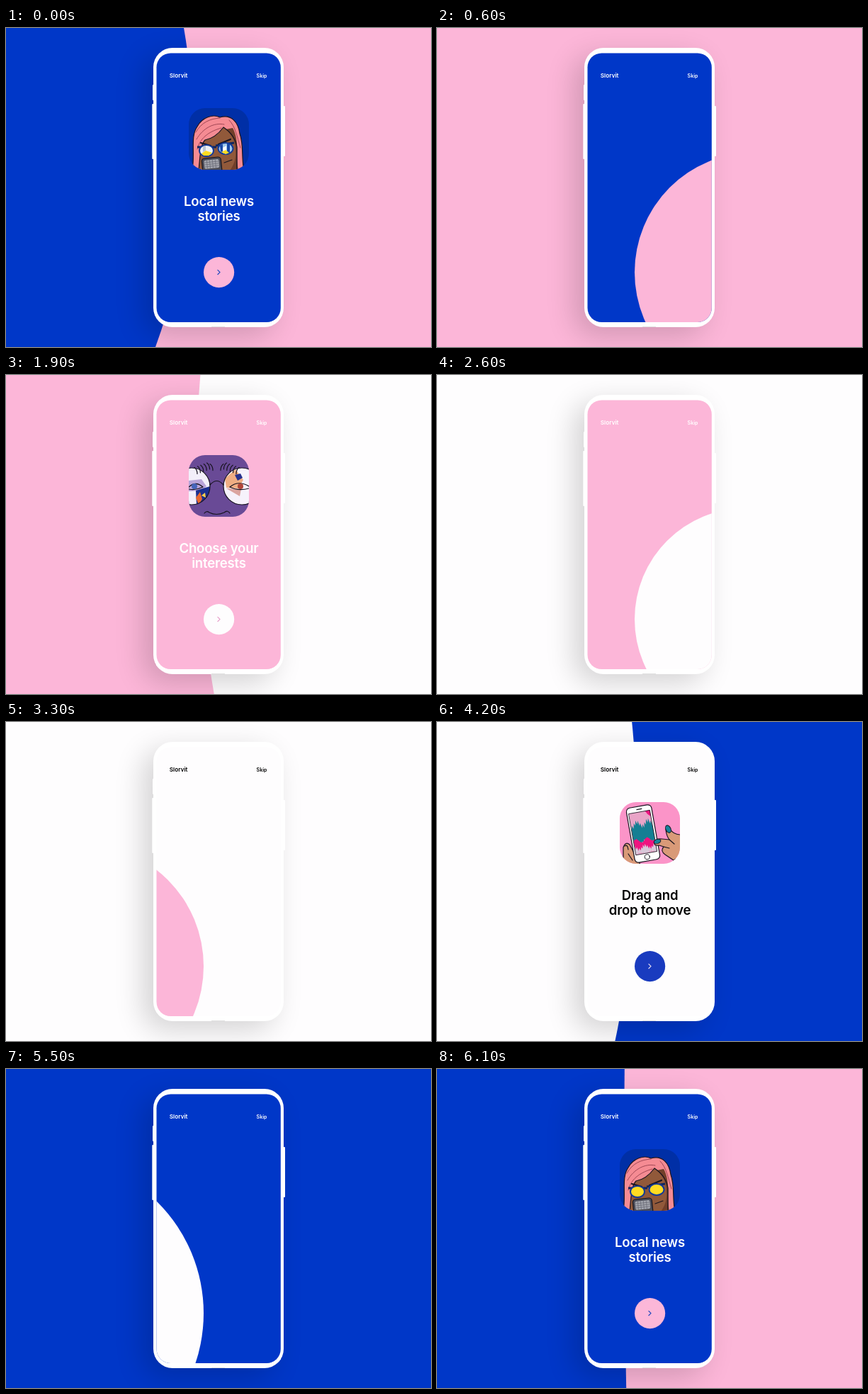
These frames come from a looping animation (600x450 px, 6200 ms). An HTML page:

```html
<!DOCTYPE html>
<html lang="en">
<head>
<meta charset="utf-8">
<title>Onboarding</title>
<style>
  html, body { margin: 0; width: 100%; height: 100%; overflow: hidden; }
  svg { display: block; width: 600px; height: 450px; }
  text { font-family: Inter, "Open Sans", sans-serif; font-weight: 600; }
  .head { font-size: 18.6px; letter-spacing: -.2px; text-anchor: middle; }
  .line { fill: none; stroke: #17131f; stroke-width: 1.2; stroke-linecap: round; stroke-linejoin: round; }
</style>
</head>
<body>
<svg viewBox="0 0 600 450">
  <defs>
    <clipPath id="screenClip"><rect x="212.5" y="35.5" width="175.3" height="379.5" rx="20"/></clipPath>
    <clipPath id="artClip"><rect width="85" height="87" rx="23"/></clipPath>
    <clipPath id="lensL"><circle cx="4" cy="44" r="26"/></clipPath>
    <clipPath id="lensR"><circle cx="75" cy="44" r="26"/></clipPath>
    <filter id="blur" x="-60%" y="-30%" width="220%" height="160%"><feGaussianBlur stdDeviation="20"/></filter>
  </defs>

  <rect id="bg" width="600" height="450"/>
  <circle id="bgDisc"/>

  <rect x="194" y="40" width="184" height="394" rx="28" fill="#000" opacity=".17" filter="url(#blur)"/>
  <g fill="#fff">
    <rect x="207" y="80" width="3" height="22" rx="1"/>
    <rect x="206.3" y="107" width="3" height="78" rx="1"/>
    <rect x="390" y="110" width="4" height="71" rx="1"/>
    <rect x="208" y="28" width="184" height="394" rx="27"/>
  </g>
  <rect x="290" y="421" width="19" height="1" fill="#000" opacity=".12"/>

  <g clip-path="url(#screenClip)">
    <rect id="screen" x="212" y="35" width="177" height="381"/>
    <circle id="disc"/>
  </g>
  <g id="bar">
    <text x="230.8" y="70.3" font-size="8.2">Slorvit</text>
    <text x="353.6" y="70.3" font-size="7">Skip</text>
  </g>

  <g class="page" fill="#fff">
    <g transform="translate(258 113)" clip-path="url(#artClip)">
      <rect width="85" height="87" fill="#002fa6"/>
      <path d="M5 88C9 62 2 40 12 26C19 13 34 8 44 13C60 8 70 20 72 36C78 52 74 70 78 88Z" fill="#f58b93"/>
      <path d="M14 88C16 70 16 52 23 45C34 43 43 35 49 27C58 33 66 42 68 55C69 70 66 78 60 88Z" fill="#91593a"/>
      <path d="M52 30C61 37 66 48 66 60C67 73 63 81 58 88H70C66 66 72 46 62 28Z" fill="#713f2a"/>
      <g class="line" stroke-width="1">
        <path d="M5 88C9 62 2 40 12 26C19 13 34 8 44 13C60 8 70 20 72 36C78 52 74 70 78 88"/>
        <path d="M14 88C16 70 16 52 23 45C34 43 43 35 49 27C58 33 66 42 68 55V88"/>
        <path d="M10 34C18 20 30 15 44 14M11 44C20 28 36 20 50 23M12 58C16 40 32 32 46 28M57 17C66 26 68 40 73 56" stroke="#8b3546" stroke-width=".8"/>
        <path d="M17 49L31 53M42 51L59 44" stroke-width="2.2"/>
      </g>
      <g stroke="#123a98" stroke-width="2">
        <path d="M12 55L39 55M38 53L64 49" stroke="#10275f" stroke-width="3"/>
        <g id="sun" fill="#ffdc22">
          <ellipse cx="25" cy="60" rx="10" ry="8"/><ellipse cx="52" cy="57" rx="10.500" ry="8"/>
        </g>
        <g id="city">
          <ellipse cx="25" cy="60" rx="10" ry="8" fill="#eef1f4"/><ellipse cx="52" cy="57" rx="10.500" ry="8" fill="#9fc8ec"/>
          <g stroke="none">
            <path d="M18 64L24 60L33 63L28 67H21Z" fill="#ffdc22"/>
            <path d="M20 55L24 53V60L20 62Z" fill="#b9c6d6"/>
            <path d="M44 53L48 51V63L45 61ZM54 50H58V64H54Z" fill="#1746a5"/>
            <path d="M48 56L53 53V64H49Z" fill="#fff"/>
            <path d="M46 62L52 59L57 63L52 65Z" fill="#ffdc22"/>
          </g>
        </g>
      </g>
      <path d="M50 77L61 73" class="line"/>
      <g transform="rotate(-6 32 80)">
        <rect x="19" y="70" width="27" height="24" rx="4" fill="#4b4c58" stroke="#15131c" stroke-width="1.2"/>
        <rect x="22" y="73" width="21" height="12" rx="2" fill="#a3a5ad"/>
        <path d="M22 76H43M22 79H43M22 82H43M26 73V85M30 73V85M34 73V85M38 73V85" stroke="#666873" stroke-width=".7"/>
      </g>
    </g>
    <text class="head"><tspan x="300.500" y="251">Local news</tspan><tspan x="300.500" y="272">stories</tspan></text>
  </g>

  <g class="page" fill="#fff">
    <g transform="translate(258 113)" clip-path="url(#artClip)">
      <rect width="85" height="87" fill="#694a96"/>
      <g clip-path="url(#lensL)">
        <rect y="15" width="32" height="60" fill="#f3effa"/>
        <path d="M0 36L18 34L25 44L18 50L0 51Z" fill="#b9a4d8"/>
        <path d="M10 50L30 44V70H11Z" fill="#1c2f8f"/>
        <path d="M10 60L16 52L19 62L14 70Z" fill="#e8672f"/>
        <path d="M18 57L23 53L24 60Z" fill="#ffd24a"/>
        <path d="M0 45Q10 36 20 45Q10 50 0 48" fill="#e6dff2" class="line" stroke-width="1"/>
        <circle cx="8" cy="44" r="4" fill="#4665ba"/>
      </g>
      <g clip-path="url(#lensR)">
        <rect x="48" y="15" width="40" height="60" fill="#f6f2fb"/>
        <path d="M51 33L66 20L77 35L70 47L53 46Z" fill="#efae83"/>
        <path d="M65 28L73 26L76 32L69 36Z" fill="#26318d"/>
        <path d="M53 47L74 48L72 58Z" fill="#dba5a0"/>
        <path d="M58 45Q70 35 85 44M58 45Q70 51 85 47" class="line"/>
        <circle cx="73" cy="44" r="4" fill="#b0473a"/>
      </g>
      <g class="line" stroke-width="1.5">
        <circle cx="4" cy="44" r="26"/><circle cx="75" cy="44" r="26"/>
        <path d="M30 42Q39.500 31 49 42"/>
        <path id="brows"/>
        <path d="M22 82Q25 78 29 81Q39 86 50 81Q55 77 58 82"/>
      </g>
    </g>
    <text class="head"><tspan x="300.500" y="251">Choose your</tspan><tspan x="300.500" y="272">interests</tspan></text>
  </g>

  <g class="page" fill="#000">
    <g transform="translate(258 113)" clip-path="url(#artClip)">
      <rect width="85" height="87" fill="#fb94c8"/>
      <path d="M5 87V64Q8 55 14 60L29 88Z" fill="#d99a78" class="line" style="fill:#d99a78"/>
      <g transform="translate(33 44.500) rotate(-10)">
        <rect x="-18" y="-39" width="36" height="78" rx="5.500" fill="#fff" stroke="#17131f" stroke-width="1.2"/>
        <rect x="-15" y="-31" width="30" height="59" fill="#e9a4c7"/>
        <path id="teal" fill="#147f93"/>
        <path id="magenta" fill="#ef1480"/>
        <path id="grey" fill="#d8c9da"/>
        <path d="M8 -31H15V-22L11 -26Z" fill="#ef1480"/>
        <rect x="-15" y="-31" width="30" height="59" class="line" style="stroke-width:.8"/>
        <path d="M-3 -35H4" class="line"/>
        <circle cy="33.300" r="3.500" class="line" style="stroke-width:.9"/>
      </g>
      <path d="M86 46Q76 46 71 38Q66 33 65 39Q66 48 70 53L60 52Q50 51 49 57Q48 62 56 61L62 63Q57 69 64 74L76 82L86 76Z" class="line" style="fill:#d99a78"/>
      <path d="M70 53L77 59M62 63L70 65" class="line"/>
      <ellipse cx="68.500" cy="38" rx="3.500" ry="5.500" transform="rotate(-25 68.500 38)" fill="#16829a" stroke="#17131f"/>
      <ellipse cx="53" cy="55.500" rx="5" ry="3" transform="rotate(-18 53 55.500)" fill="#16829a" stroke="#17131f"/>
      <path d="M7 62Q11 59 12 67M12 73L18 82" class="line"/>
    </g>
    <text class="head"><tspan x="300.500" y="251">Drag and</tspan><tspan x="300.500" y="272">drop to move</tspan></text>
  </g>

  <path id="arrow" d="M298.600 341.200L302 344.600L298.600 348" fill="none" stroke-width="1.1"/>
</svg>

<script>
const LOOP = 6200;
const BLUE = [0, 55, 200], PINK = [252, 182, 216], WHITE = [254, 253, 254];
const fills = [BLUE, PINK, WHITE];
const buttons = [PINK, WHITE, [25, 59, 191]];
const arrows = ['#1b45bd', '#e69cc9', '#e9dff2'];
const bars = ['#fff', '#fff', '#000'];

// Moments at which each growing disc has become a straight vertical edge.
const bgFlats = [-92, 1952, 4140], phoneFlats = [947, 2958, 5195];
const bgAnchors = [264, 268, 283];
const BTN = { left: 279, y: 344.6, r: 21.6 };

const $ = id => document.getElementById(id);
const pages = [...document.querySelectorAll('.page')];
const clamp = x => Math.min(1, Math.max(0, x));
const smooth = x => (x = clamp(x), x * x * (3 - 2 * x));
const mix = (a, b, k) => a.map((v, i) => v + (b[i] - v) * k);
const rgb = c => `rgb(${c.map(Math.round)})`;
const at = (list, i) => list[i % list.length];

function nearest(t, flats) {
  let best = { dt: Infinity };
  flats.forEach((flat, k) => {
    let dt = (t - flat + LOOP) % LOOP;
    if (dt > LOOP / 2) dt -= LOOP;
    if (Math.abs(dt) < Math.abs(best.dt)) best = { k, dt };
  });
  return best;
}

// Radius shrinks from infinity at the flat moment to `base` after `span` ms.
function radius(dt, span, base, gain) {
  const u = Math.min(1, Math.max(.003, Math.abs(dt) / span));
  return base + gain * (1 / u - 1);
}

function setDisc(el, edge, cy, r, side, color) {
  el.setAttribute('cx', edge + side * r);
  el.setAttribute('cy', cy);
  el.setAttribute('r', r);
  el.setAttribute('fill', rgb(color));
}

function drawBackground(t) {
  const { k, dt } = nearest(t, bgFlats);
  const growing = dt < 0, from = at(fills, k), to = at(fills, k + 1);
  $('bg').setAttribute('fill', rgb(growing ? from : to));
  setDisc($('bgDisc'), bgAnchors[k], 150, radius(dt, 500, 0, 200), growing ? 1 : -1, growing ? to : from);
}

function drawPhone(t) {
  const { k, dt } = nearest(t, phoneFlats);
  const growing = dt < 0, page = (growing ? k : k + 1) % 3;
  const r = radius(dt, 550, BTN.r, 250);
  $('screen').setAttribute('fill', rgb(fills[page]));
  if (growing) {
    const color = mix(buttons[k], at(fills, k + 1), clamp(1 + dt / 250));
    setDisc($('disc'), BTN.left, BTN.y, r, 1, color);
  } else {
    const shift = 2 * BTN.r * smooth((dt - 400) / 250);
    const color = mix(fills[k], buttons[page], smooth((dt - 500) / 430));
    setDisc($('disc'), BTN.left + shift, BTN.y, r, -1, color);
  }
  $('bar').setAttribute('fill', bars[page]);

  const alpha = growing ? smooth((-dt - 400) / 220) : smooth((dt - 380) / 300);
  pages.forEach((el, i) => el.setAttribute('opacity', i === page ? alpha : 0));
  $('arrow').setAttribute('stroke', arrows[page]);
  $('arrow').setAttribute('opacity', growing ? alpha : smooth((dt - 600) / 250));

  const sunny = !growing && dt < 960;
  $('sun').setAttribute('opacity', sunny ? 1 : 0);
  $('city').setAttribute('opacity', sunny ? 0 : 1);
}

// Jagged band across the drawn handset.
function band(top, bottom, height, seed) {
  const upper = [], lower = [];
  for (let x = -15; x <= 15; x += 1.5) {
    const jag = Math.sin(x * 2.1 + seed) * height + Math.sin(x * .4 + seed) * height;
    upper.push(`${x} ${top + jag}`);
    lower.unshift(`${x} ${Math.min(28, bottom - jag * .7)}`);
  }
  return `M${upper.concat(lower).join('L')}Z`;
}
$('teal').setAttribute('d', band(-14, 12, 3.5, 1));
$('magenta').setAttribute('d', band(9, 22, 3, 3));
$('grey').setAttribute('d', band(19, 27, 2.4, 5));

let brows = '';
for (let i = 0; i < 6; i++) {
  const x = 8 + i * 4.4, y = 11 + Math.abs(i - 4) * 1.6;
  brows += `M${x} ${y}q4 3 4 9M${79 - x} ${y}q-4 3 -4 9`;
}
$('brows').setAttribute('d', brows);

const start = performance.now();
function frame() {
  const t = (performance.now() - start) % LOOP;
  drawBackground(t);
  drawPhone(t);
  requestAnimationFrame(frame);
}
frame();
</script>
</body>
</html>
```
